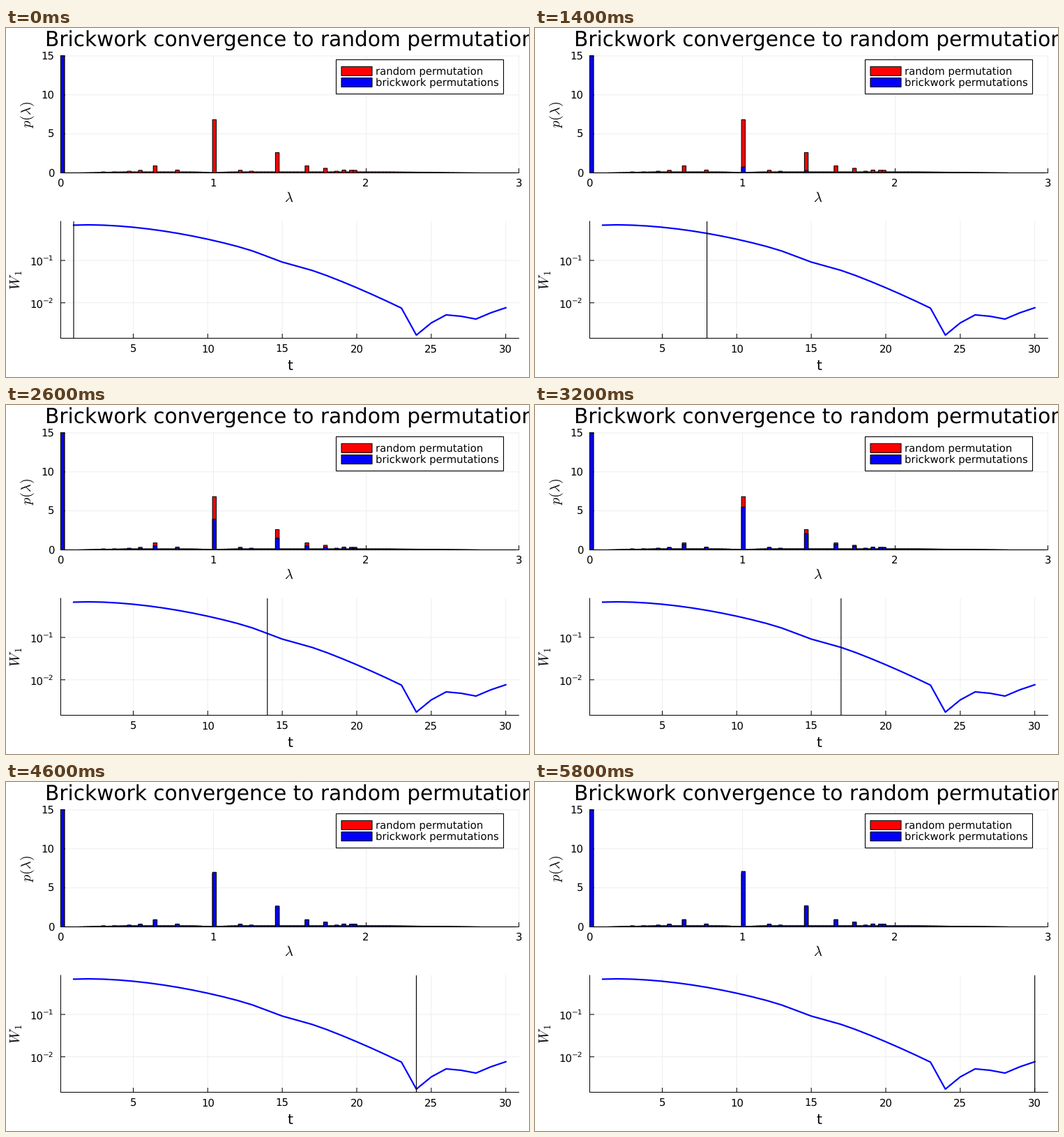
Write a matplotlib script that moves like this. It is 750 by 500 pixels and loops after 6 s.

```python
from math import gcd

import numpy as np
import matplotlib.pyplot as plt
from matplotlib.animation import FuncAnimation
from matplotlib.patches import Rectangle

plt.rcParams.update({"font.family": "DejaVu Sans", "mathtext.fontset": "cm",
                     "text.hinting": "none", "path.snap": False})
W, H, DPI = 750, 500, 100
PT = 72 / DPI
STEPS, LOOP = 30, 6000

LEFT, RIGHT = 78.5, 735.5
TOP1, BASE1 = 40, 207.5
TOP2, BASE2 = 277, 444.5
UNIT_X, UNIT_Y = 219.0, 167.5 / 15
BIN = 5.309
BINS = 123

fig = plt.figure(figsize=(W / DPI, H / DPI), dpi=DPI, facecolor="white")
ax = fig.add_axes([0, 0, 1, 1])
ax.set(xlim=(0, W), ylim=(H, 0))
ax.axis("off")


def line(xs, ys, color="black", width=1.0, z=2, **kw):
    return ax.plot(xs, ys, color=color, lw=width * PT, zorder=z, **kw)[0]


def label(x, y, s, px=14.9, ha="center", va="baseline", **kw):
    ax.text(x, y, s, fontsize=px * PT, ha=ha, va=va, zorder=8, **kw)


def box(x, y, w, h, color, z):
    patch = Rectangle((x, y), w, h, facecolor=color, edgecolor="black",
                      lw=1.1 * PT, zorder=z, joinstyle="miter")
    return ax.add_patch(patch)


def step_x(t):
    return 182.5 + (t - 5) * 21.367


def frame(top, base, xs, ys):
    for x in xs:
        line([x, x], [top, base], "#eeeeee", z=1)
        line([x, x], [base - 6, base])
    for y in ys:
        line([LEFT, RIGHT], [y, y], "#eeeeee", z=1)
        line([LEFT, LEFT + 6], [y, y])
    line([LEFT, LEFT], [top, base], solid_capstyle="projecting")
    line([LEFT, RIGHT], [base, base], solid_capstyle="projecting")


def spectrum():
    """Smooth background with peaks at 2 cos(pi k / n)."""
    lam = (np.arange(BINS) + 0.5) * BIN / UNIT_X
    rise = np.clip((lam - 0.12) / 0.3, 0, 1)
    fall = np.clip((2.75 - lam) / 0.6, 0, 1)
    dip = 1 - 0.7 * np.exp(-((lam - 1) / 0.08) ** 2)
    h = 0.13 * rise * fall * dip
    for n in range(3, 13):
        peak = 0.12 + 6.7 * np.exp(-1.08 * (n - 3)) + 0.2 * (n % 2 == 0)
        for k in range(1, (n + 1) // 2):
            if gcd(k, n) == 1:
                i = int(2 * np.cos(np.pi * k / n) * UNIT_X / BIN + 1e-9)
                h[i] = max(h[i], peak)
    h[0] = 15
    return h


target = spectrum()


def brickwork(t):
    grown = 1.045 * (1 - np.exp(-(max(t - 3, 0) / 12.2) ** 2.6))
    # the faint background fills in sooner than the peaks
    h = target * np.where(target < 0.3, grown ** 0.5, grown ** 0.95)
    h[0] = 15
    return h


def histogram(heights, color, z):
    return [box(LEFT + i * BIN, BASE1 - h * UNIT_Y, BIN, h * UNIT_Y, color, z)
            for i, h in enumerate(heights)]


def distance_y():
    """Slow power-law fall, then a sharp minimum and a noisy floor."""
    t = np.arange(1, 24)
    fall = 282 + 0.468 * abs(t - 2) ** 1.82 + 3.5 * np.exp(-((t - 15) / 1.5) ** 2)
    return np.append(fall, [440, 422.5, 411, 413, 417, 408, 400.8])


# Upper panel
frame(TOP1, BASE1, LEFT + UNIT_X * np.arange(4), BASE1 - UNIT_Y * np.arange(0, 16, 5))
for k in range(4):
    label(LEFT + k * UNIT_X - 0.4, 227, str(k))
    label(69, BASE1 - 5 * k * UNIT_Y + 5.4, str(5 * k), ha="right")
label(407.5, 27, "Brickwork convergence to random permutation", 29.6)
label(405.7, 243.5, r"$\lambda$", 20.5, va="center")
label(31, 124.5, r"$p(\lambda)$", 20, va="center", rotation=90)
histogram(target, "red", 3)
bars = histogram(brickwork(1), "blue", 4)

box(473.5, 45.5, 240, 49, "white", 6)
for y, color, name in [(61.8, "red", "random permutation"),
                       (78, "blue", "brickwork permutations")]:
    box(481, y - 6.5, 44, 13, color, 7)
    label(530.5, y + 5.3, name, ha="left")

# Lower panel
frame(TOP2, BASE2, step_x(np.arange(5, 31, 5)), [333, 393.7])
for t in range(5, 31, 5):
    label(step_x(t), 465, str(t))
for y, power in [(333, 1), (393.7, 2)]:
    label(34, y + 7, "10", ha="left")
    label(53, y + 0.3, f"\u2212{power}", 10.5, ha="left")
label(407, 489.6, "t", 20.3)
label(15, 361, "$W{}_1$", 20.5, va="center", rotation=90)
line(step_x(np.arange(1, 31)), distance_y(), "blue", 2.2, 4, solid_joinstyle="round")
cursor = line([step_x(1)] * 2, [TOP2, BASE2], width=1.15, z=5, solid_capstyle="butt")


def update(n):
    t = n + 1
    for bar, h in zip(bars, brickwork(t)):
        bar.set_y(BASE1 - h * UNIT_Y)
        bar.set_height(h * UNIT_Y)
    cursor.set_xdata([step_x(t)] * 2)
    return [*bars, cursor]


anim = FuncAnimation(fig, update, frames=STEPS, interval=LOOP // STEPS,
                     repeat=True, repeat_delay=0, blit=False)
plt.show()
```
